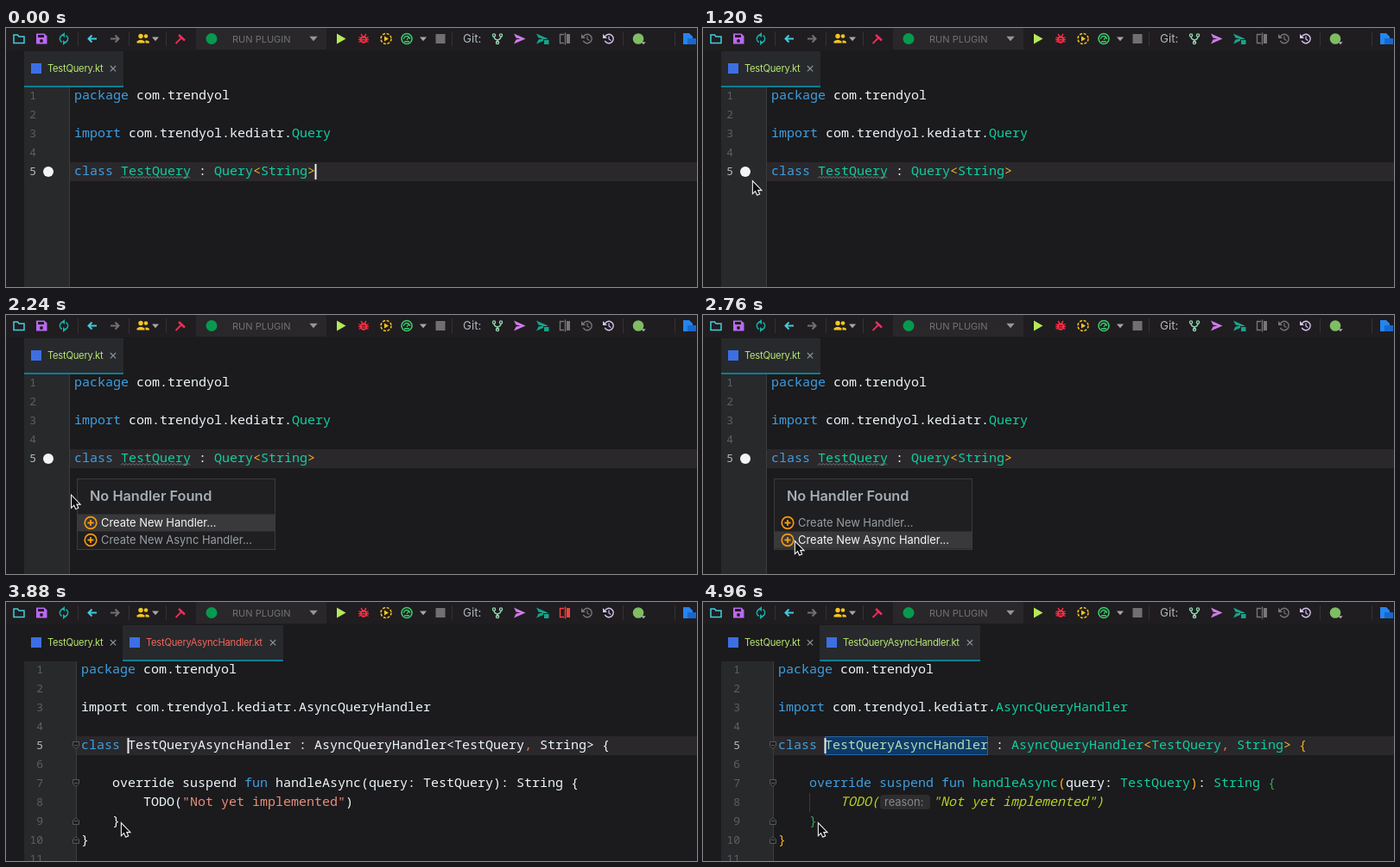
An HTML page with a canvas for the animation above (5000 ms loop, 800 px wide and 301 px high).

```html
<!DOCTYPE html>
<html lang="en">
<head>
<meta charset="utf-8">
<style>
  html, body { margin: 0; overflow: hidden; background: #1b1a1c; }
  canvas { display: block; }
</style>
</head>
<body>
<canvas id="stage" width="800" height="301"></canvas>
<script>
const ctx = document.getElementById('stage').getContext('2d');
const LOOP = 5000, STEP = 40, CHAR = 9, LINE = 22;
const UI = 'Inter, sans-serif', MONO = '"Noto Sans Mono", monospace';
const INK = { w: '#eef7fb', k: '#3e9fe0', t: '#10cfa2', o: '#f9b21d', s: '#e58f7b',
              g: '#2faa55', c: '#d9774f', l: '#b4d321', n: '#b5dcb4' };
const at = { popup: 1800, async: 2760, close: 3680, file: 3800, colors: 4000, clean: 4160, resolve: 4600 };
// time, x, y of the pointer tip
const path = [[480, 118, 306], [960, 57, 178], [1240, 57, 178], [1480, 52, 169], [1760, 52, 169],
              [2200, 75, 209], [2360, 76, 212], [2760, 106, 263], [3160, 130, 266], [3440, 133, 257]];

function rect(x, y, w, h, color) {
  ctx.fillStyle = color;
  ctx.fillRect(x, y, w, h);
}
function disc(x, y, r, color) {
  ctx.fillStyle = color;
  ctx.beginPath();
  ctx.arc(x, y, r, 0, 7);
  ctx.fill();
}
function stroke(d, color, width = 1.5) {
  ctx.strokeStyle = color;
  ctx.lineWidth = width;
  ctx.stroke(new Path2D(d));
}
function fill(d, color) {
  ctx.fillStyle = color;
  ctx.fill(new Path2D(d));
}
function ring(x, y, r, color, width = 1.5, from = 0, to = 2 * Math.PI) {
  ctx.strokeStyle = color;
  ctx.lineWidth = width;
  ctx.beginPath();
  ctx.arc(x, y, r, from, to);
  ctx.stroke();
}
function label(text, x, y, size, color, { weight = 400, spacing = 0 } = {}) {
  ctx.font = `${weight} ${size}px ${UI}`;
  ctx.letterSpacing = spacing + 'px';
  ctx.fillStyle = color;
  ctx.fillText(text, x, y);
  ctx.letterSpacing = '0px';
}
const dropdown = (x, y, s, color) => fill(`M${x - s} ${y - s / 2}h${2 * s}l${-s} ${s * 1.2}z`, color);
const baseline = row => 61 + row * LINE;

// Each token starts with the key of its ink.
function code(row, x, tokens, style = '') {
  ctx.font = `${style} 500 15px ${MONO}`;
  for (const token of tokens) {
    ctx.fillStyle = INK[token[0]];
    ctx.fillText(token.slice(1), x, baseline(row));
    x += (token.length - 1) * CHAR;
  }
}

function toolbar(t) {
  rect(0, 0, 800, 26, '#1f1d20');
  rect(220, 0, 151, 25, '#29272a');
  for (const x of [83, 142, 185, 516, 714, 774]) rect(x, 4, 1, 17, '#343236');

  stroke('M9 17.5V8h4.5l1.5 2h6v7.5z', '#42cfdc');
  fill('M35 6.5h9.5l3 3v9H35z', '#ba68f2');
  rect(37, 8, 7, 3, '#1f1d20');
  disc(41, 15, 1.9, '#1f1d20');
  ring(67, 12.5, 4.6, '#12b5ac', 1.6, -1, 1.6);
  ring(67, 12.5, 4.6, '#12b5ac', 1.6, 2.1, 4.7);
  fill('M68 5v6l-3.5-3zM66 14v6l3.5-3z', '#12b5ac');
  stroke('M105 12.5h-9M99.500 8.500l-4 4 4 4', '#45c9dc', 2);
  stroke('M121 12.5h9M126.500 8.500l4 4-4 4', '#717174', 2);

  disc(156, 9.5, 2.7, '#f7c51e');
  disc(162, 9.5, 2.3, '#f7c51e');
  fill('M151.500 17.500v-2q4.500-3.500 9 0v2zM161.500 17.500v-3q4-.5 4.500 2v1z', '#f7c51e');
  dropdown(173, 12.5, 4, '#a6a8ab');
  stroke('M196.500 18l7-7', '#f12d59', 1.8);
  stroke('M200 8l7 6.500', '#f12d59', 2.4);

  disc(238, 12.5, 6.5, '#079a4e');
  label('RUN PLUGIN', 262, 16.5, 11, '#707376');
  dropdown(356, 12, 4.7, '#91989d');

  fill('M383 6.500l10.500 6-10.500 6z', '#b4ea58');
  disc(414, 13.5, 4.3, '#f52f43');
  stroke('M408.500 10.500l11 6M419.500 10.500l-11 6M408 13.500h12M411 7l2 3M417 7l-2 3', '#f52f43', 1.4);
  rect(412, 12, 4, 1, '#1f1d20');
  rect(412, 14.5, 4, 1, '#1f1d20');
  ctx.setLineDash([3, 1.7]);
  ring(440, 12.5, 6, '#f7c51e', 1.5);
  ctx.setLineDash([]);
  fill('M438 9.500l5 3-5 3z', '#f7c51e');
  ring(464, 12.5, 6, '#3bcb6b', 1.6);
  stroke('M460.500 13a3.500 3.500 0 0 1 7 0M464 14l2-3', '#3bcb6b', 1.3);
  rect(461, 15, 6, 1.5, '#3bcb6b');
  dropdown(483, 12.5, 4, '#a6a8ab');
  rect(497.5, 7, 11, 11, '#707073');

  label('Git:', 529, 17, 13.3, '#aeb5b9');
  stroke('M569 17v-3q-4-1-4-4M569 14q4-1 4-4', '#95dab2', 1.4);
  for (const [x, y] of [[565, 8.5], [573, 8.5], [569, 17]]) ring(x, y, 1.6, '#95dab2', 1.3);
  fill('M588 6.500l13.500 6-13.500 6 2.500-5 5-1-5-1z', '#d07bea');
  fill('M614 6.500l13.500 6-13.500 6 2.500-5 5-1-5-1z', '#16a489');
  rect(622, 13, 7, 6, '#1f1d20');
  rect(623, 14, 5.5, 5, '#16a489');
  const diff = t >= at.file && t < at.clean ? '#f4433c' : '#747679';
  stroke('M646 7.500h-4.500v10h4.500M647.500 5.500v14', diff, 1.4);
  rect(649, 7, 4, 11, diff);
  for (const [x, color] of [[673, '#747679'], [698, '#d6c4ee']]) {
    ring(x, 12.5, 5.2, color, 1.4, -2.6, 2.7);
    fill(`M${x - 7} 7v5h5z`, color);
    stroke(`M${x} 9.500v3.500l2.500 1.500`, color, 1.2);
  }
  disc(732, 12.5, 6.3, '#7fbd63');
  dropdown(738, 17.5, 2.6, '#b0b3b6');
  fill('M784 6h7l4 4v9h-11z', '#2585ee');
  rect(789, 12, 10, 7, '#1668cf');
}

function tab(x, width, name, color, active) {
  if (active) {
    rect(x, 27, width, 40, '#27292c');
    rect(x, 67, width, 2, '#0b7f94');
  }
  rect(x + 8, 41, 12, 12, '#3c6fe4');
  label(name, x + 27, 51, 11.2, color, { spacing: -.25 });
  const c = x + width - 12;
  stroke(`M${c - 3.2} 44l6.400 6.400M${c + 3.200} 44l-6.400 6.400`, '#8b969c', 1.1);
}

function gutter(edge, rows) {
  rect(21, 69, edge - 21, 232, '#27292b');
  rect(edge, 156, 800 - edge, 22, '#2a282b');
  rect(edge - 1, 69, 1, 232, '#3c3d40');
  ctx.font = `13px ${MONO}`;
  ctx.textAlign = 'right';
  for (let row = 1; row <= rows; row++) {
    ctx.fillStyle = row === 5 ? '#b5babd' : '#5c6063';
    ctx.fillText(row, edge - 39, baseline(row));
  }
  ctx.textAlign = 'left';
}

function queryFile(t) {
  tab(21, 115, 'TestQuery.kt', '#b9e872', true);
  gutter(74, 5);
  disc(49, 167, 6, '#f2f4f5');
  code(1, 79, ['kpackage ', 'wcom.trendyol']);
  code(3, 79, ['kimport ', 'wcom.trendyol.kediatr.', 'tQuery']);
  code(5, 79, ['kclass ', 'tTestQuery', 'w : ', 'tQuery', 'o<', 'tString', 'o>']);
  stroke('M133 174.500' + 'l2-2 2 2'.repeat(20), '#737a78', 1);
  if (t < 120 || (t >= 600 && t < 1100) || (t >= 1600 && t < at.popup)) rect(357.5, 158, 2, 18, '#e8eef0');
}

function popup(t) {
  rect(82, 190, 230, 83, '#3b3b3e');
  rect(83, 191, 228, 81, '#1f1e20');
  label('No Handler Found', 97, 216, 16.3, '#a4b0b8', { weight: 600 });
  ['Create New Handler...', 'Create New Async Handler...'].forEach((name, i) => {
    const y = 241.5 + i * 20, selected = (t >= at.async) === (i === 1);
    if (selected) rect(83, y - 10, 228, 20, '#39383b');
    ring(98, y, 6.8, '#f79a0e', 1.7);
    stroke(`M94.500 ${y}h7M98 ${y - 3.500}v7`, '#f79a0e', 1.8);
    label(name, 110, y + 4.5, 12.9, selected ? '#f5f7f8' : '#989fa4');
  });
}

function handlerFile(t) {
  const colored = t >= at.colors, resolved = t >= at.resolve;
  const ink = (early, late) => colored ? late : early;
  const kw = ink('w', 'k'), bracket = ink('w', 'o'), type = resolved ? 't' : 'w';

  tab(21, 115, 'TestQuery.kt', '#b9e872', false);
  tab(135, 186, 'TestQueryAsyncHandler.kt', t < at.clean ? '#f2665c' : '#b9e872', true);
  gutter(82, 11);
  for (const [row, dir] of [[5, 1], [7, 1], [9, -1], [10, -1]]) {
    const y = baseline(row) - 4.5;
    const d = `M77.500 ${y - 4 * dir}h7v${4.5 * dir}l-3.500 ${3.5 * dir}l-3.500 ${-3.5 * dir}z`;
    fill(d, '#1f1f21');
    stroke(d, '#55585b', 1);
    stroke(`M79 ${y}h4`, '#55585b', 1);
  }
  if (colored) {
    rect(141, 156, 189, 22, '#2763a0');
    rect(142, 157, 187, 20, '#0d3a69');
    rect(123, 222, 1, 22, '#3a393c');
  }
  code(1, 87, ['kpackage ', 'wcom.trendyol']);
  code(3, 87, [kw + 'import ', 'wcom.trendyol.kediatr.', type + 'AsyncQueryHandler']);
  code(5, 87, ['kclass ', ink('w', 'n') + 'TestQueryAsyncHandler', 'w : ', type + 'AsyncQueryHandler',
    bracket + '<', type + 'TestQuery', 'c,', type + ' String', bracket + '> ', bracket + '{']);
  code(7, 123, [kw + 'override suspend ', 'kfun ', ink('w', 't') + 'handleAsync', bracket + '(', 'wquery: ',
    type + 'TestQuery', bracket + ')', 'w: ', type + 'String ', ink('w', 'g') + '{']);
  if (resolved) {
    code(8, 159, ['lTODO('], 'italic');
    ctx.fillStyle = '#2d2c2f';
    ctx.beginPath();
    ctx.roundRect(205, 224, 58, 17, 4);
    ctx.fill();
    label('reason:', 210, 237, 12.9, '#85898c');
    code(8, 266, ['l"Not yet implemented")'], 'italic');
  } else {
    code(8, 159, ['wTODO(', 's"Not yet implemented"', 'w)']);
  }
  code(9, 123, [(resolved ? 'g' : 'w') + '}']);
  code(10, 87, [(resolved ? 'o' : 'w') + '}']);
  rect(140.5, 158, 2, 18, '#e8eef0');
}

function pointer(t) {
  if (t < path[0][0]) return;
  let i = 0;
  while (i < path.length - 2 && t >= path[i + 1][0]) i++;
  const [t0, x0, y0] = path[i], [t1, x1, y1] = path[i + 1];
  const p = Math.min(1, (t - t0) / (t1 - t0)), e = p * p * (3 - 2 * p);
  ctx.save();
  ctx.translate(x0 + (x1 - x0) * e, y0 + (y1 - y0) * e);
  ctx.scale(.9, .9);
  const arrow = 'M1 1v14l3.200-3 2.300 5.200 2.400-1-2.300-5h4.200z';
  stroke(arrow, '#f4f4f4', 2.4);
  fill(arrow, '#0c0c0d');
  ctx.restore();
}

function frame(now) {
  const t = Math.floor(now % LOOP / STEP) * STEP;
  rect(0, 0, 800, 301, '#1b1a1c');
  toolbar(t);
  if (t < at.file) queryFile(t);
  else handlerFile(t);
  if (t >= at.popup && t < at.close) popup(t);
  pointer(t);
}

const start = performance.now();
function tick() {
  frame(performance.now() - start);
  requestAnimationFrame(tick);
}
tick();
</script>
</body>
</html>
```
